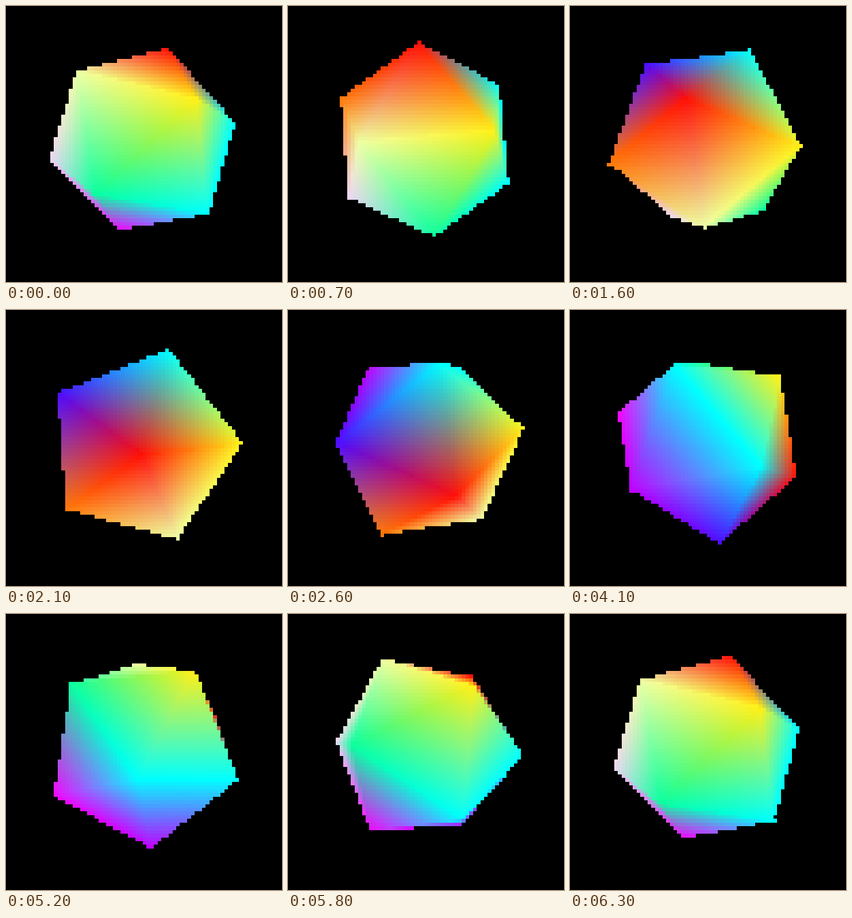
An HTML page with a canvas for the animation above (6400 ms loop, 480 by 480 pixels).

```html
<!DOCTYPE html>
<html lang="en">
<head>
<meta charset="utf-8">
<title>Rotating icosahedron</title>
<style>
  html, body { margin: 0; height: 100%; overflow: hidden; background: #000; }
  canvas { display: block; }
</style>
</head>
<body>
<canvas id="stage" width="480" height="480"></canvas>
<script>
const ctx = document.getElementById('stage').getContext('2d');

// The picture is made of coarse square cells.
const CELL = 6.44, LEFT = -0.3, TOP = 2.1;
const CENTER_X = 37, CENTER_Y = 36, FOCAL = 76, CAMERA = 3;
const FRAMES = 64, FRAME_MS = 100, STEP = 0.1, START = -0.657;
const EDGE = 0.015;

const dot = (a, b) => a[0] * b[0] + a[1] * b[1] + a[2] * b[2];
const unit = v => v.map(n => n / Math.hypot(...v));

function rotate(v, axis, angle) {
  const [x, y, z] = axis, c = Math.cos(angle), s = Math.sin(angle);
  const k = dot(axis, v) * (1 - c);
  const cross = [y * v[2] - z * v[1], z * v[0] - x * v[2], x * v[1] - y * v[0]];
  return v.map((n, i) => n * c + cross[i] * s + axis[i] * k);
}

const PHI = (1 + Math.sqrt(5)) / 2;
const spin = unit([0.6, 0.3, 0.5]);
const tilt = unit([-0.73, 0.11, 0.67]);

const corners = [
  [[0, PHI, 1], [255, 16, 8]],
  [[0, PHI, -1], [78, 12, 255]],
  [[0, -PHI, 1], [12, 255, 160]],
  [[0, -PHI, -1], [240, 8, 255]],
  [[1, 0, PHI], [255, 240, 24]],
  [[-1, 0, PHI], [238, 255, 165]],
  [[1, 0, -PHI], [190, 5, 255]],
  [[-1, 0, -PHI], [255, 210, 60]],
  [[PHI, 1, 0], [0, 255, 255]],
  [[PHI, -1, 0], [0, 255, 255]],
  [[-PHI, 1, 0], [255, 120, 10]],
  [[-PHI, -1, 0], [238, 214, 242]]
].map(([pos, color]) => ({ pos: rotate(unit(pos), tilt, 0.089), color }));

// Three mutually adjacent corners form a face.
const adjacent = (i, j) => dot(corners[i].pos, corners[j].pos) > 0.4;
const faces = [];
for (let i = 0; i < 12; i++)
  for (let j = i + 1; j < 12; j++)
    for (let k = j + 1; k < 12; k++)
      if (adjacent(i, j) && adjacent(j, k) && adjacent(i, k)) faces.push([i, j, k]);

function fillCell(col, row, color) {
  const x = Math.round(col * CELL + LEFT), y = Math.round(row * CELL + TOP);
  ctx.fillStyle = `rgb(${color})`;
  ctx.fillRect(x, y, Math.round((col + 1) * CELL + LEFT) - x, Math.round((row + 1) * CELL + TOP) - y);
}

function fillFace(a, b, c) {
  const xs = [a.x, b.x, c.x], ys = [a.y, b.y, c.y];
  const area = (b.x - a.x) * (c.y - a.y) - (c.x - a.x) * (b.y - a.y);
  const weight = (p, q, x, y) => ((q.x - p.x) * (y - p.y) - (x - p.x) * (q.y - p.y)) / area;
  for (let row = Math.floor(Math.min(...ys)) - 1; row <= Math.max(...ys) + 1; row++) {
    for (let col = Math.floor(Math.min(...xs)) - 1; col <= Math.max(...xs) + 1; col++) {
      const x = col + 0.5, y = row + 0.5;
      const wa = weight(b, c, x, y), wb = weight(c, a, x, y), wc = 1 - wa - wb;
      if (Math.min(wa, wb, wc) < -EDGE) continue;
      fillCell(col, row, a.color.map((n, i) =>
        Math.max(0, Math.min(255, Math.round(n * wa + b.color[i] * wb + c.color[i] * wc)))));
    }
  }
}

function draw(time) {
  const angle = START + STEP * (Math.floor(time / FRAME_MS) % FRAMES);
  const points = corners.map(({ pos, color }) => {
    const [x, y, z] = rotate(pos, spin, angle), scale = FOCAL / (CAMERA - z);
    return { x: CENTER_X + x * scale, y: CENTER_Y - y * scale, z, color };
  });
  ctx.fillStyle = '#000';
  ctx.fillRect(0, 0, 480, 480);
  const facing = (1 + 2 / Math.sqrt(5)) / CAMERA;
  for (const face of faces) {
    const [a, b, c] = face.map(i => points[i]);
    if (a.z + b.z + c.z > facing) fillFace(a, b, c);
  }
}

function tick() {
  draw(performance.now());
  requestAnimationFrame(tick);
}
tick();
</script>
</body>
</html>
```
